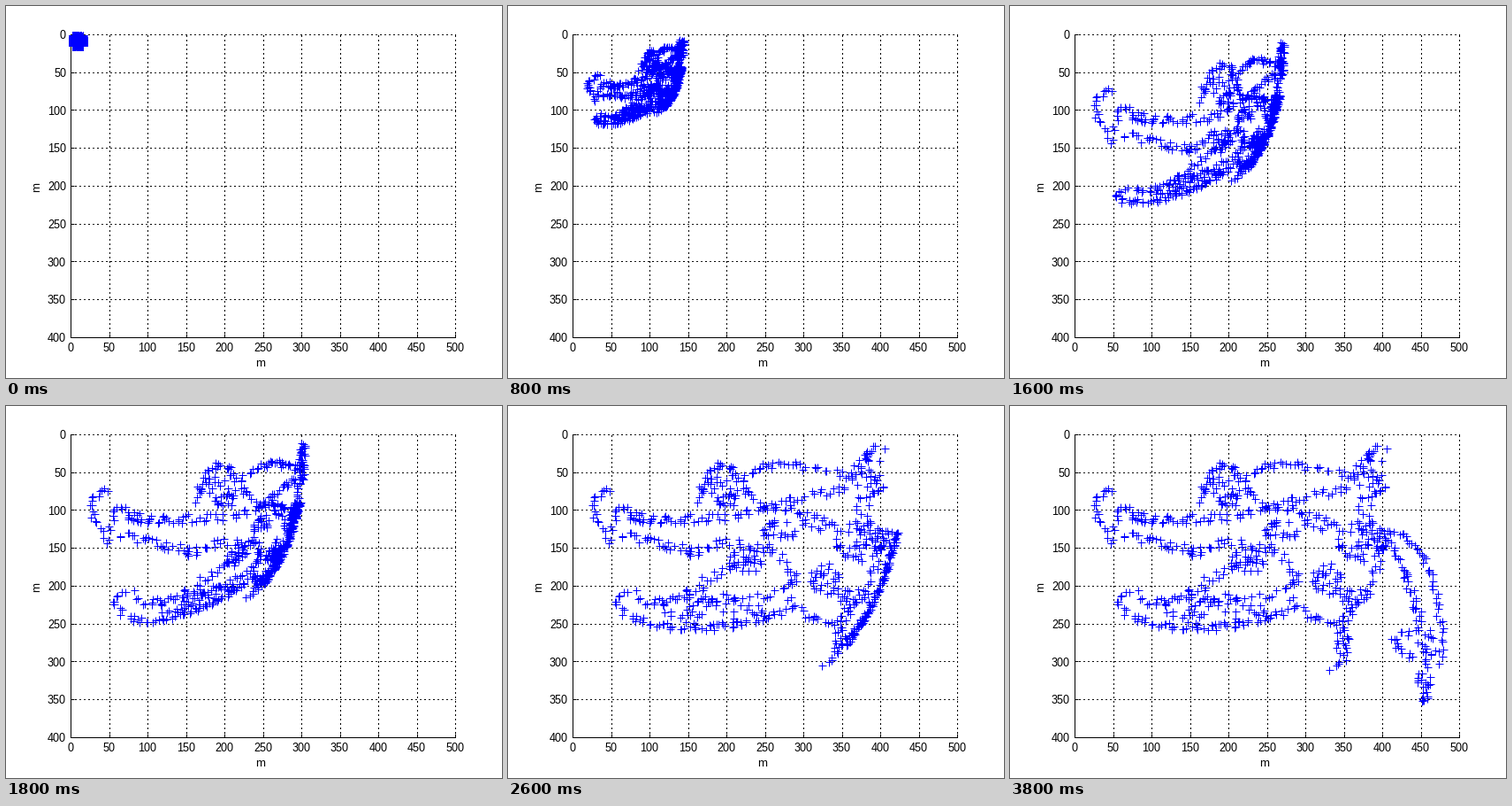
A matplotlib script for the animation above (4 s loop, 561 by 420 pixels).

```python
import numpy as np
import matplotlib.pyplot as plt
from matplotlib.animation import FuncAnimation

W, H = 561, 420
LEFT, RIGHT, TOP, BOTTOM = 73, 508, 32, 374
LOOP, STEP = 4000, 200
FONT = dict(family="Liberation Sans", size=13.2, color="black")

plt.rcParams.update({"toolbar": "None", "text.hinting": "default", "text.hinting_factor": 1})
rng = np.random.default_rng(12)


def arc(a, via, b, spread=5, gap=4.4):
    """Loose crosses along the parabola through three points, in metres."""
    a, via, b = np.array([a, via, b], float)
    length = np.hypot(*(via - a)) + np.hypot(*(b - via))
    t = np.linspace(0, 1, int(length / gap))[:, None]
    line = a * (1 - t) * (1 - 2 * t) + via * 4 * t * (1 - t) + b * t * (2 * t - 1)
    return line + rng.uniform(-spread, spread, line.shape)


def cloud(x, y, rx, ry, n):
    """Crosses scattered evenly inside an ellipse."""
    r, a = np.sqrt(rng.random(n)), rng.uniform(0, 2 * np.pi, n)
    return np.c_[x + rx * r * np.cos(a), y + ry * r * np.sin(a)]


def upper_part():
    return [
        arc((50, 72), (27, 95), (50, 141), 3),
        arc((52, 138), (57, 98), (75, 108), 4),
        arc((75, 107), (140, 112), (245, 102), 6, 3.3),
        arc((66, 132), (115, 143), (155, 157), 6, 3.3),
        arc((155, 157), (200, 143), (252, 153)),
        arc((160, 88), (195, 41), (245, 97), 4),
        cloud(198, 74, 32, 22, 42),
        arc((232, 50), (285, 41), (362, 56)),
        arc((362, 56), (380, 32), (402, 14), 6),
        cloud(383, 65, 21, 48, 42),
    ]


def middle_part():
    return [
        arc((245, 100), (300, 82), (355, 72)),
        arc((250, 98), (305, 103), (345, 130)),
        cloud(295, 125, 45, 13, 20),
        arc((265, 112), (252, 135), (284, 180)),
        arc((284, 180), (275, 204), (215, 216)),
        arc((235, 155), (182, 188), (140, 214), 6),
        cloud(225, 165, 33, 17, 24),
        cloud(372, 140, 34, 28, 58),
    ]


def lower_part():
    return [
        arc((80, 205), (58, 221), (82, 245), 4),
        arc((82, 222), (150, 217), (215, 216), 6),
        arc((80, 243), (170, 255), (280, 232), 5),
        cloud(175, 234, 95, 17, 50),
        arc((283, 215), (310, 243), (365, 238), 6),
        arc((342, 250), (355, 280), (333, 313), 4),
        cloud(344, 270, 6, 20, 8),
        cloud(330, 190, 22, 21, 30),
        cloud(362, 216, 20, 12, 14),
        arc((345, 242), (380, 205), (397, 150), 7),
    ]


def tail():
    return [
        arc((400, 125), (459, 177), (476, 303), 4),
        arc((402, 130), (432, 190), (448, 255), 5, 3.4),
        arc((447, 256), (414, 276), (452, 297), 5),
        cloud(460, 274, 15, 18, 14),
        cloud(453, 327, 10, 29, 24),
    ]


def start_points(goal):
    rank = goal.argsort(axis=0).argsort(axis=0) / len(goal)
    spot = rank * 14 + rng.uniform(-4, 4, goal.shape)
    return np.clip(spot, 0, 14) + (2, 1)


goal = np.vstack(upper_part() + middle_part() + lower_part() + tail())
start = start_points(goal)
path = goal - start
dist = np.hypot(*path.T)
angle = np.arctan2(path[:, 1], path[:, 0])
top_speed = 0.16 + 0.006 * np.sin(2 * angle)
travel = np.maximum(800 + 4 * dist, dist / top_speed)  # ms

fig = plt.figure(figsize=((W + 0.01) / 72, (H + 0.01) / 72), dpi=72, facecolor="white")
ax = fig.add_axes([LEFT / W, 1 - BOTTOM / H, (RIGHT - LEFT) / W, (BOTTOM - TOP) / H])
ax.set(xlim=(0, 500), ylim=(400, 0))
ax.set_xticks(range(0, 501, 50))
ax.set_yticks(range(0, 401, 50))
ax.set_axisbelow(True)
# Half a pixel of dash offset keeps every dot on one pixel.
ax.grid(color="black", linewidth=1, linestyle=(0.5, (1, 3)), antialiased=False, clip_on=False)
ax.tick_params(direction="in", length=4, width=1, labelbottom=False, labelleft=False)
ax.spines[["top", "right"]].set_visible(False)
for side in ("left", "bottom"):
    ax.spines[side].set(linewidth=1, color="black")


def label(x, y, text, **kw):
    fig.text(x / W, 1 - y / H, text, **FONT, **kw)


for v in range(0, 501, 50):
    label(LEFT + v * 0.87, 390, str(v), ha="center", va="baseline")
for v in range(0, 401, 50):
    label(68, TOP + v * 0.855 + 5, str(v), ha="right", va="baseline")
label(288, 407, "m", ha="center", va="baseline")
label(35, 204, "m", ha="center", va="center", rotation=90)

dots, = ax.plot([], [], "+", color=(0, 0, 1), markersize=9, markeredgewidth=1,
                antialiased=False, clip_on=False, zorder=3)


def draw(k):
    share = np.minimum(k * STEP / travel, 1)[:, None]
    dots.set_data(*(start + path * share).T)
    return dots,


anim = FuncAnimation(fig, draw, frames=LOOP // STEP, interval=STEP, repeat=True, repeat_delay=0)
plt.show()
```
